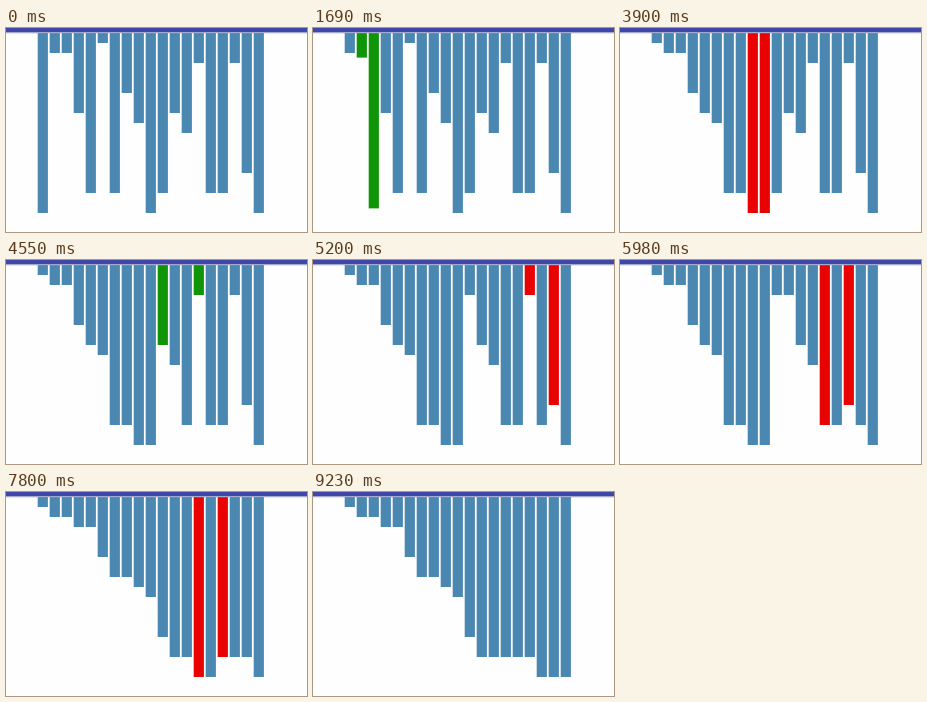
Recreate the animation shown at these times as a matplotlib script. Size 301 by 204 pixels, loop 9360 ms.

```python
import numpy as np
import matplotlib.pyplot as plt
from matplotlib.animation import FuncAnimation
from matplotlib.patches import Rectangle

W, H, DPI = 301, 204, 100
FRAMES, STEP = 72, 130
BLUE, RED, GREEN = "#4a87b1", "#e90202", "#109408"
TOP, UNIT = 5, 10
LEFT, PITCH, BAR = 31.7, 12, 10.2

START = [18, 2, 2, 8, 16, 1, 16, 6, 9, 18, 16, 8, 10, 3, 16, 16, 3, 14, 18]

# Pace of the sort: frame number -> operations finished
PACE_FRAME = [6, 13, 23, 30, 40, 53, 66]
PACE_OPS = [0, 4.83, 21.98, 34.5, 49.5, 69.93, 89]


def merge_sort(a, lo, hi, ops):
    """In-place merge sort that records (colour, i, j, before, after)."""
    if lo >= hi:
        return
    mid = (lo + hi) // 2
    merge_sort(a, lo, mid, ops)
    merge_sort(a, mid + 1, hi, ops)
    i, j = lo, mid + 1
    while i <= mid and j <= hi:
        before = a[:]
        ops.append((RED, i, j, before, before))
        if a[i] > a[j]:
            a.insert(i, a.pop(j))
            ops.append((GREEN, i, j, before, a[:]))
            mid += 1
            j += 1
        i += 1


ops = []
result = START[:]
merge_sort(result, 0, len(result) - 1, ops)


def state(frame):
    """Heights and colours of all bars at a frame."""
    colours = [BLUE] * len(START)
    if frame < PACE_FRAME[0]:
        return np.array(START, float), colours
    pos = np.interp(frame, PACE_FRAME, PACE_OPS)
    k = int(pos)
    if k >= len(ops):
        return np.array(result, float), colours
    t = pos - k
    colour, i, j, before, after = ops[k]
    if t < 0.96:
        colours[i] = colours[j] = colour
    ease = 1 - (1 - t) ** 2
    before, after = np.array(before, float), np.array(after, float)
    return before + (after - before) * ease, colours


fig = plt.figure(figsize=(W / DPI + 1e-9, H / DPI + 1e-9), dpi=DPI,
                 facecolor="#fefefe")
ax = fig.add_axes([0, 0, 1, 1])
ax.set_xlim(0, W)
ax.set_ylim(H, 0)
ax.axis("off")


def box(x, y, w, h, colour, z=1):
    patch = Rectangle((x, y), w, h, facecolor=colour, linewidth=0,
                      snap=False, zorder=z)
    return ax.add_patch(patch)


bars = [box(LEFT + PITCH * n, TOP, BAR, UNIT * v, BLUE)
        for n, v in enumerate(START)]

# Toolbar edge with its soft shadow
box(0, 0, W, 4, "#4047a8", 3)
box(0, 4, W, 1, "#a3a8cf", 3)
box(0, 5, W, 1, (0.6, 0.62, 0.75, 0.25), 3)


def draw(frame):
    heights, colours = state(frame)
    for bar, h, c in zip(bars, heights, colours):
        bar.set_height(UNIT * h)
        bar.set_facecolor(c)
    return bars


anim = FuncAnimation(fig, draw, frames=FRAMES, interval=STEP,
                     init_func=lambda: draw(0), repeat=True, repeat_delay=0)
plt.show()
```
